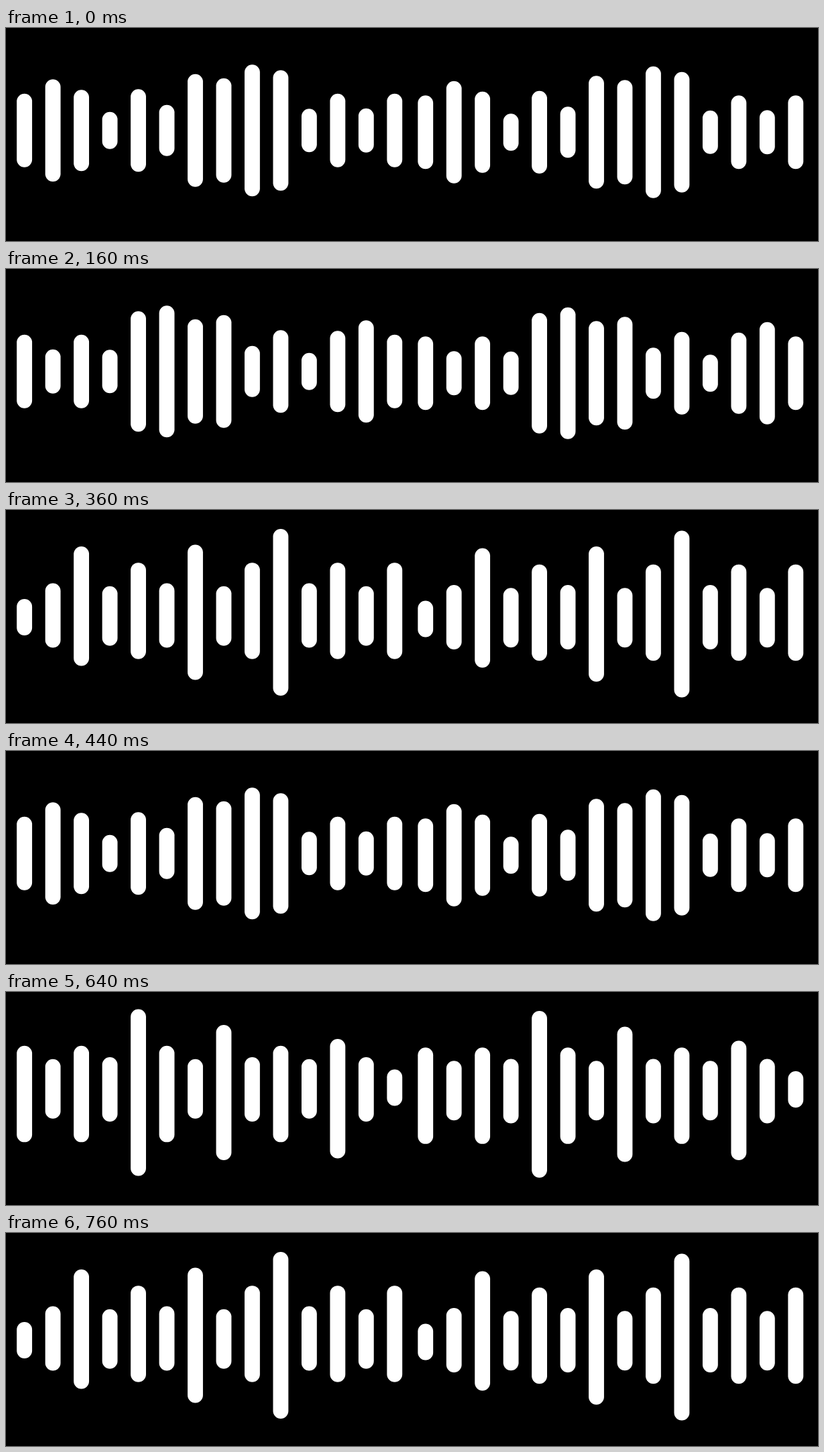
Write an HTML page with a canvas that moves like this. It is 1154 px wide and 304 px high and loops after 800 ms.

```html
<!DOCTYPE html>
<html lang="en">
<head>
<meta charset="utf-8">
<title>Sound wave</title>
<style>
  html, body { margin: 0; width: 100%; height: 100%; overflow: hidden; background: #000; }
  canvas { display: block; }
</style>
</head>
<body>
<canvas id="stage" width="1154" height="304"></canvas>
<script>
const ctx = document.getElementById('stage').getContext('2d');

const LOOP = 800;
const BAR_WIDTH = 21.8;
const FIRST_X = 26.2, STEP_X = 40.47;
const GROUP_X = 570, GROUP_Y = 2.5;
const AXIS = 146;
const TURN_SUM = 289.5;

// A wave is a row of peaks with one short bar between each pair; the dips repeat.
function wave(peaks, dips) {
  return peaks.flatMap((peak, i) => i ? [dips[(i - 1) % dips.length], ...peak] : peak);
}

// Short bars hang below the axis, longer ones reach above it, the tallest are centred.
function loudCentre(height) {
  return height > 180 ? AXIS : 153 - 15.8 * ((height - 52) / 118.5) ** 1.7;
}

const mid = 105, high = 137.5;
const soft = wave([[mid, 146, 116], [118], [161, 149, 188, 172], [mid], [mid]], [53, 73, 62, 63])
  .map(height => ({ y: AXIS + 0.2, height }));
const loud = wave([[52], [170.5], [high], [193], [high, 238], [high], [high]], [92, 85])
  .map(height => ({ y: loudCentre(height), height }));

const mirror = pose => [...pose].reverse();
const turn = pose => mirror(pose).map(({ y, height }) => ({ y: TURN_SUM - y, height }));

const poses = [soft, mirror(soft), turn(loud), loud];
const changes = [160, 240, 360, 440, 560, 640, 760];

function poseAt(time) {
  const step = changes.filter(change => change <= time).length;
  return poses[step % poses.length];
}

function drawBar(x, y, height) {
  ctx.beginPath();
  ctx.roundRect(x - BAR_WIDTH / 2, y - height / 2, BAR_WIDTH, height, BAR_WIDTH / 2);
  ctx.fill();
}

function draw(time) {
  ctx.fillStyle = '#000';
  ctx.fillRect(0, 0, 1154, 304);
  ctx.fillStyle = '#fff';
  for (let group = 0; group < 2; group++) {
    poseAt(time).forEach(({ y, height }, i) => {
      drawBar(FIRST_X + i * STEP_X + group * GROUP_X, y + group * GROUP_Y, height);
    });
  }
}

const start = performance.now();
function tick() {
  draw((performance.now() - start) % LOOP);
  requestAnimationFrame(tick);
}
tick();
</script>
</body>
</html>
```
